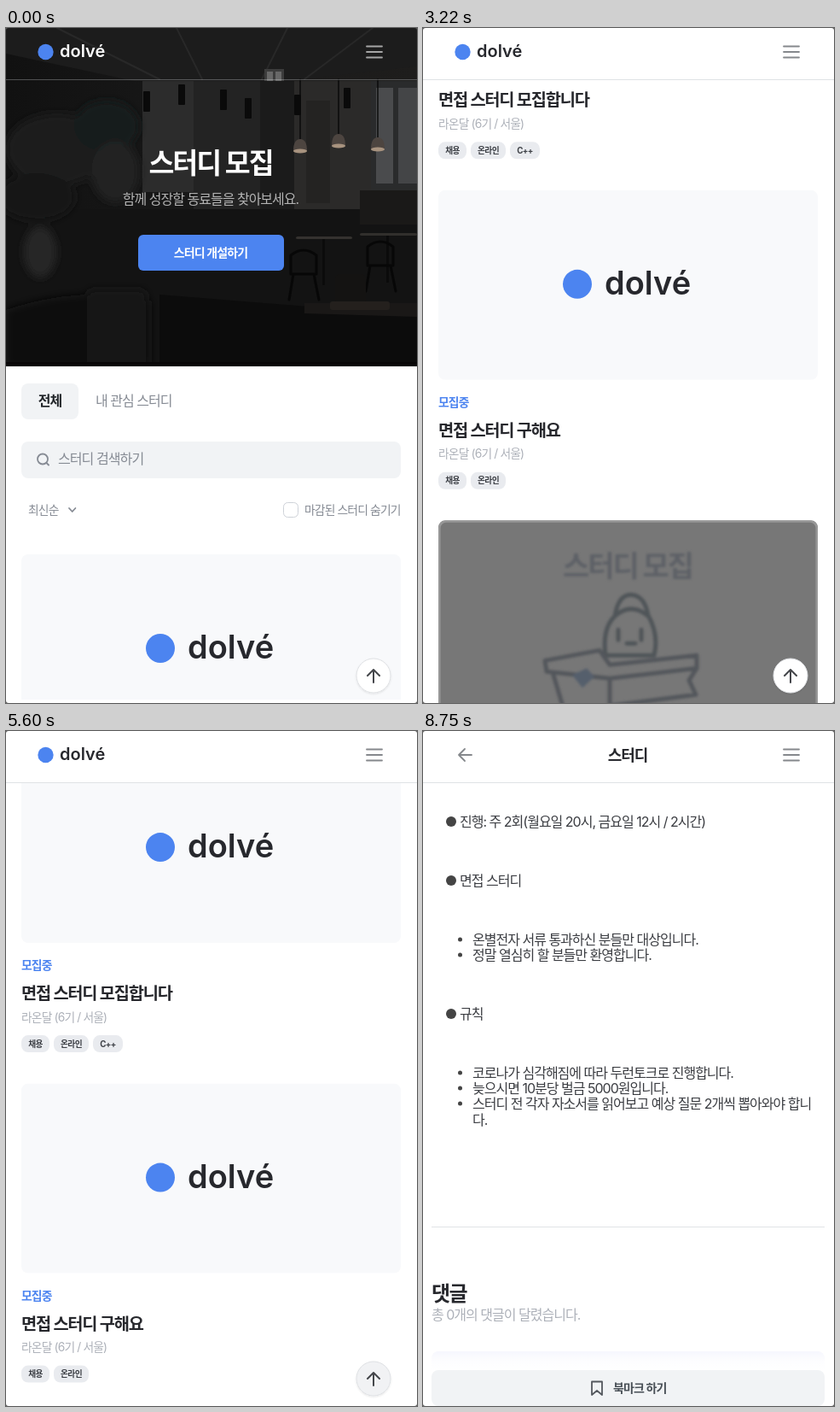
Animation, 482 px wide and 790 px high, one loop 8.82 s. Source, as an HTML page:

```html
<!DOCTYPE html>
<html lang="ko">
<head>
<meta charset="utf-8">
<title>스터디 모집</title>
<style>
  html, body { margin: 0; width: 100%; height: 100%; overflow: hidden; background: #fff; }
  svg { display: block; width: 482px; height: 790px; }
  text { font-family: Inter, "Noto Sans CJK KR", "Noto Sans CJK", "Noto Sans KR", sans-serif; letter-spacing: -.062em; white-space: pre; }
  .brand { font-family: Inter, sans-serif; letter-spacing: 0; }
</style>
</head>
<body>
<svg id="stage" viewBox="0 0 482 790"></svg>
<script>
const LOOP = 8820, STEP = 70, PITCH = 386.5, FIRST = 616;
const BLUE = '#4c84f0', INK = '#27282d', GRAY = '#868b94', PALE = '#adb1b9', FIELD = '#f1f3f5';

// Drawing helpers
const rect = (x, y, w, h, fill, r = 0, more = '') => `<rect x="${x}" y="${y}" width="${w}" height="${h}" rx="${r}" fill="${fill}" ${more}/>`;
const oval = (x, y, rx, ry, fill, more = '') => `<ellipse cx="${x}" cy="${y}" rx="${rx}" ry="${ry}" fill="${fill}" ${more}/>`;
const dot = (x, y, r, fill, more = '') => oval(x, y, r, r, fill, more);
const path = (d, fill, more = '') => `<path d="${d}" fill="${fill}" ${more}/>`;
const line = (d, stroke, w = 2, more = '') => `<path d="${d}" fill="none" stroke="${stroke}" stroke-width="${w}" stroke-linecap="round" stroke-linejoin="round" ${more}/>`;
const text = (x, cy, s, size, fill, weight = 400, anchor = 'start') =>
  `<text x="${x}" y="${(cy + size * .37).toFixed(2)}" font-size="${size}" fill="${fill}" font-weight="${weight}" text-anchor="${anchor}">${s}</text>`;
const group = (body, more = '') => `<g ${more}>${body}</g>`;
const brand = (x, base, size, fill, more = '') =>
  `<text class="brand" x="${x}" y="${base}" font-size="${size}" font-weight="600" fill="${fill}" ${more}>dolvé</text>`;

function tag(x, y, s) {
  const w = 17 + [...s].reduce((n, c) => n + (c > 'z' ? 8 : 6), 0);
  return { w, svg: rect(x, y, w, 20, '#e9ebef', 8) + text(x + w / 2, y + 10, s, 9.7, '#3c3f45', 700, 'middle') };
}

function heroPhoto() {
  const lamp = (x, y) => line(`M${x} 60V${y - 8}`, '#0b0b0b', 1.5) +
    path(`M${x - 8} ${y + 6}q0-14 8-14t8 14z`, '#4d4540') + oval(x, y + 6, 8, 2.5, '#a8937f');
  const spot = (x, y) => rect(x - 4, y, 8, 24, '#0a0a0a', 1);
  const chair = (x, y) => line(`M${x} ${y}q15-12 30 0v22h-30zm3 22l-5 30m29-30l6 30`, '#070707', 3);
  return group(rect(0, 0, 482, 396, 'url(#room)') +
    path('M0 0H482V45L330 62H150L0 30Z', '#1c1c1c') +
    line('M60 0L180 60M200 0L230 60M330 0L300 60M430 0L350 60', '#282828', 2) +
    rect(303, 48, 23, 18, '#3c3c3c') + rect(306, 51, 7, 11, '#686868') + rect(316, 51, 7, 11, '#686868') +
    rect(160, 62, 60, 130, '#2c2c2c') + rect(220, 62, 78, 150, '#232323') + rect(298, 62, 40, 150, '#1b1b1b') +
    rect(338, 62, 90, 150, '#2b2a29') + rect(352, 85, 28, 120, '#242322') +
    rect(428, 62, 54, 128, '#2a2b2c') + rect(434, 70, 20, 112, '#4a4b4d') + rect(460, 70, 22, 112, '#444547') +
    rect(0, 212, 482, 184, '#131313') + rect(415, 190, 67, 40, '#1a1918') +
    group(oval(60, 142, 60, 42, '#1b1c1c') + oval(118, 115, 38, 30, '#191a1a') + oval(128, 168, 28, 36, '#212222') +
      oval(36, 198, 45, 28, '#161717') + oval(40, 262, 19, 30, '#262626') +
      path('M0 330Q90 300 170 320V396H0Z', '#101010') + rect(95, 306, 70, 100, '#191918', 8), 'filter="url(#soft)"') +
    [[165, 74], [206, 66], [255, 72], [284, 82], [342, 78], [400, 70]].map(p => spot(...p)).join('') +
    lamp(345, 138) + lamp(390, 132) + lamp(436, 136) +
    rect(340, 244, 66, 3, '#35322f', 2) + rect(371, 247, 3, 54, '#0b0b0b') + rect(415, 240, 67, 3, '#312f2c', 2) + rect(446, 243, 3, 55, '#0b0b0b') +
    chair(334, 266) + chair(424, 256) +
    path('M180 312L482 336V396H180Z', '#0c0c0c') + path('M350 322H482V338L350 334Z', '#1a1817') +
    rect(386, 288, 36, 36, '#141312', 5) + rect(380, 320, 70, 10, '#24201d', 3) + rect(0, 391, 482, 5, '#080607'),
    'clip-path="url(#heroClip)"');
}

const logoThumb = () => rect(18, 0, 445, 222, '#f8f9fb') + dot(181, 110, 17, BLUE) + brand(213, 122, 38, INK);

function deskThumb(dy) {
  const skin = '#f9c5ab', navy = '#2d2b5c', wood = '#fdbf8a';
  const plant = (x, c) => path(`M${x} 188q-14-40-6-60q10 24 6 60q0-40 13-62q0 46-13 62q-14-16-8-38q10 18 8 38z`, c) +
    path(`M${x - 6} 188h13l3 27q-1 8-9 8t-10-8z`, '#b9d5f0');
  return rect(18, 0, 445, 222, '#fff') + group(
    oval(247, 222, 165, 5, '#e9ebee') + dot(181, -9, 16, '#fff', 'stroke="#5b95f0" stroke-width="4"') +
    rect(308, -8, 71, 70, '#dfe9f7') + rect(312, -8, 63, 33, '#c9ddfa') + rect(312, 29, 63, 29, '#f6f9fd') + line('M343 0V25M320 22L336 0', '#e8f1fd', 4) + rect(306, 61, 75, 4, '#cbdcf3') +
    plant(58, '#83cf63') + plant(421, '#62d2b4') +
    line('M97 146L108 151H154M157 151V222', '#cdd3d8', 5) +
    path('M83 121H100L89 222H79Z', wood) + path('M181 121H193L206 222H196Z', wood) +
    path('M103 92Q98 45 125 42Q140 43 138 57L128 80Z', '#f2700f') + path('M123 58L135 56Q139 75 128 77L127 88H117Z', skin) +
    path('M109 79Q122 87 130 80L147 112H90Q92 84 109 79Z', '#f346a0') + path('M94 112H148V122H89Z', '#e5318d') +
    path('M106 122H146Q160 126 163 147L178 215H165L146 151L108 147Z', '#fbda85') + path('M118 147H143L170 216H157Z', '#f7cf73') +
    path('M154 222q3-8 15-9l9 1l5 8z', '#e65b49') +
    path('M157 80H199L187 113H147Z', '#d9dde1') + dot(172, 98, 3, '#fff') +
    path('M243 119H289L283 214H272L264 140L256 214H243Z', navy) + path('M239 222q3-9 18-10l4 10zm29 0q3-9 17-10l5 10z', '#48b848') +
    path('M242 49Q254 38 272 44Q291 47 295 83V112H241L241 73L214 66L217 57L241 61Z', '#7fc83f') +
    path('M270 79Q267 92 253 94L247 88L264 71Z', '#64ad34') + oval(267, 65, 6, 7, skin) +
    oval(256, 26, 9, 13, skin) + path('M240 15Q240 2 252 6Q271 1 270 17L266 28L262 15L247 16L246 26Z', navy) +
    path('M189 37L212 46L245 52L247 66L219 69L203 61Z', '#7767cd') + path('M189 37L212 46L219 69L203 61Z', '#443580') + oval(240, 66, 5, 4, skin) +
    path('M192 108Q220 99 238 109Q258 99 286 108L278 113H198Z', '#6f86b4') + path('M204 107Q222 102 238 110Q254 102 274 107L266 111H210Z', '#8ca5cd') +
    path('M270 121H291L286 222H265Z', '#da965b') +
    path('M326 76Q346 65 365 78Q378 86 380 119H327L323 105L277 117L272 109L318 91Z', '#8fc5f4') + line('M326 104L340 92', '#70abe2', 2) +
    path('M328 119H368L362 144H320L329 213H315L298 147Q300 128 328 119Z', navy) + path('M340 144H325L333 213H342Z', '#24214b') +
    path('M309 222q2-10 14-11l8 11zm22 0l2-11h8l3 11z', '#38bddd') +
    oval(335, 68, 10, 13, skin) + path('M324 61Q322 47 337 49Q358 46 352 68L343 78L341 61Z', navy) +
    rect(68, 112, 273, 9, '#c7dcfb', 4) + rect(68, 112, 114, 9, '#6697f1', 4) +
    path('M363 104H405L402 148Q401 153 390 153H331L334 147H354Z', '#e9ecf0') + path('M342 153H353L340 222H333Z', wood) + path('M374 153H386L398 222H388Z', wood)
    , `transform="translate(0 ${dy})"`);
}

function teamThumb() {
  const deep = '#2f5f9f', hair = '#292b49', brown = '#91573e', pale = '#8fc2ed';
  const chair = (x, s) => group(line('M0 119L13 178H48M15 178L5 218M43 178L56 218', '#4475b7', 4), `transform="translate(${x} 0) scale(${s} 1)"`);
  const note = (x, y, w, h, c) => rect(x, y, w, h, c, 2) + line(`M${x + 5} ${y + 7}h${w - 10}m${10 - w} 5h${w - 15}`, '#fff', 2);
  return rect(18, 0, 445, 222, '#fff') +
    path('M53 40Q66 4 130 6L350 0Q417 8 427 54Q439 146 421 222H72Q48 192 62 149Q72 107 56 78Z', '#e5f0fd') +
    path('M140 0H331V95H140Z', '#f4f9ff') + line('M140 0V95H331V0', '#cde1f9', 5) +
    dot(70, 28, 12, 'none', 'stroke="#f09a93" stroke-width="8"') + line('M70 16A12 12 0 0 1 80 35', '#85c7c9', 8) + line('M58 28A12 12 0 0 1 65 17', '#8eb9f1', 8) +
    note(113, 9, 49, 22, '#9fc6f5') + rect(116, 15, 43, 13, '#f7fbff') + line('M120 20h27m-27 4h20', '#9fc6f5', 2) +
    note(71, 58, 42, 18, '#8fbcf0') + path('M98 76h8v7z', '#8fbcf0') + note(176, 4, 15, 16, '#f3d38e') + note(258, 5, 21, 13, '#f19793') + note(269, 20, 20, 14, '#a6cbf5') +
    [6, 13, 17, 9, 15, 8].map((h, i) => rect(157 + i * 7, 60 - h, 4, h, '#8bb9ef')).join('') +
    path('M212 40Q211 34 208 30A18 18 0 1 1 237 30Q233 34 232 40Z', '#fbdc7c') + line('M217 38L214 20L222 26L230 20L227 38', '#fff2be', 2) + rect(210, 42, 25, 15, '#78a9e8', 4) + rect(217, 55, 11, 6, '#6595d5', 3) +
    dot(326, 20, 17, 'none', 'stroke="#c3daf8" stroke-width="9"') + dot(326, 20, 24, 'none', 'stroke="#c3daf8" stroke-width="6" stroke-dasharray="9 9.85"') +
    dot(380, 13, 7, '#8dcca0') + line('M377 13l2 3l5-5', '#fff', 1.5) + dot(402, 59, 13, '#91bcf0') + path('M403 58V46A13 13 0 0 1 415 58Z', '#ef9386') +
    [351, 358, 365].map(x => dot(x, 62, 2, '#86b6ef')).join('') +
    chair(73, 1) + chair(165, 1) + chair(394, -1) +
    path('M112 112Q128 107 135 127L148 146L141 154H88Q88 122 112 112Z', '#82bbe9') + path('M92 154H140Q152 156 153 174L163 212H152L138 174H104Q91 170 92 154Z', deep) + path('M150 212h14l5 6h-19z', '#24406e') +
    oval(121, 101, 8, 12, '#754938') + path('M107 101Q104 86 122 86Q137 87 131 99L116 97L113 110Z', hair) + line('M110 130L130 149L148 146', '#754938', 4) +
    path('M188 114Q210 107 218 127L229 147L187 157Q173 131 188 114Z', '#9bccf2') + path('M182 154H222Q236 158 232 182L240 207L232 209L222 174H193Z', deep) +
    oval(204, 100, 8, 12, brown) + path('M190 102Q184 88 200 86Q219 86 213 98L199 99L195 110Z', hair) + dot(200, 86, 6, hair) +
    path('M232 209l8-2l1 13h-5z', '#d57f3f') +
    path('M281 106H307L305 148L300 198H289L284 147L272 140Z', '#4f8cc6') + path('M277 78Q298 70 307 86L310 116H276L274 90L252 75L255 68Z', '#74b9e6') +
    rect(242, 65, 16, 11, '#f6cf79', 2, 'transform="rotate(-16 250 71)"') + line('M256 71l6 4', brown, 4) +
    path('M280 54Q282 37 297 39Q313 41 311 64L315 98Q301 106 296 81Z', hair) + oval(287, 57, 7, 12, brown) +
    path('M348 122Q366 108 376 121Q388 137 380 155H342L340 143Z', '#f1e0df') + line('M353 131L341 146L326 145', '#e8574b', 6) +
    path('M340 154H382Q386 176 369 178H347L333 214H325L329 173Q330 157 340 154Z', pale) +
    oval(353, 101, 8, 13, '#f0b69f') + path('M345 91Q358 80 370 94L372 107Q402 96 404 124Q401 146 382 147Q385 134 368 116L357 111Z', hair) +
    path('M231 125H260L252 147H222Z', '#5f91d3') + path('M268 127H296L303 147H275Z', '#78a6dd') +
    rect(149, 147, 189, 4, deep, 2) + line('M244 151V194M244 194L211 212M244 194L277 212', deep, 3) +
    path('M402 202Q382 190 386 174Q402 178 402 202Q393 164 409 159Q419 175 402 202Q411 176 431 177Q431 195 402 202Z', '#a4d5ad') + rect(394, 201, 17, 15, '#638fc7', 3);
}

const closedThumb = () => rect(18, 0, 445, 222, '#777') + rect(19, 1, 443, 220, 'none', 8, 'stroke="#979797" stroke-width="3"') +
  group(text(240, 53, '스터디 모집', 34, '#5d6066', 700, 'middle') +
    line('M214 158Q210 126 225 112Q229 87 244 87Q260 88 264 111Q277 134 271 158ZM225 112Q244 95 264 112M229 128v12m27-12v12M239 144h10', '#505459', 5) +
    line('M143 164L207 152L219 169L321 158V173L219 185L145 177ZM153 181L165 221M219 185V221M321 173L312 187L320 204L219 217', '#53565b', 5) +
    path('M175 181l17-8l9 10l-14 13z', '#555e6c'), 'filter="url(#smudge)"');

function waveThumb() {
  const wave = x => path(`M${x} 0A17 55 0 0 0 ${x} 110A17 55.5 0 0 1 ${x} 221V222H${x + 113}V221A17.5 55.5 0 0 0 ${x + 113} 110A17 55 0 0 1 ${x + 113} 0Z`, '#fff');
  return rect(18, 0, 445, 221, '#9966ff') + wave(66) + wave(317);
}

const cards = [
  [logoThumb(), '온별전자 면접 스터디 구합니다 !!', '라온달 (6기 / 서울)', '채용 온라인 C++'],
  [logoThumb(), '면접 스터디 준비 같이해요!', '라온달 (6기 / 서울)', '채용 온라인 C++'],
  [deskThumb(-4), '면접 준비 같이 하실 분', '밝은코더스 (6기 / 서울)', '채용 온라인 C'],
  [logoThumb(), '면접 스터디 모집합니다', '라온달 (6기 / 서울)', '채용 온라인 C++'],
  [logoThumb(), '면접 스터디 구해요', '라온달 (6기 / 서울)', '채용 온라인'],
  [closedThumb(), '마감된 스터디', '프론트엔드', '프로젝트 온라인', true],
  [waveThumb(), '오호', '꼭붙고말거야', '프로젝트 온라인'],
  [deskThumb(0), '느루장터 면접 준비 스터디', '밝은코더스 (6기 / 서울)', '채용 온라인 C++'],
  [teamThumb(), '면접 스터디', '밝은코더스 (6기 / 서울)', '채용 온라인']
];

function card([thumb, title, author, tags, closed], i) {
  let x = 18;
  const pills = tags.split(' ').map(s => { const p = tag(x, 330, s); x += p.w + 5; return p.svg; }).join('');
  return group(
    group(group(thumb, 'clip-path="url(#thumbClip)"'), `id="thumb${i}"`) +
    text(18, 248, closed ? '모집완료' : '모집중', 13.8, closed ? PALE : BLUE, 700) +
    text(18, 280.6, title, 19.8, INK, 700) + text(18, 308.4, author, 13.8, PALE) + pills,
    `transform="translate(0 ${FIRST + i * PITCH})"`);
}

const listPage = () => heroPhoto() +
  text(240, 157.5, '스터디 모집', 32.5, '#fff', 700, 'middle') +
  text(240, 200, '함께 성장할 동료들을 찾아보세요.', 16, '#b3b3b3', 400, 'middle') +
  rect(155, 242, 171, 42, BLUE, 6) + text(240, 263, '스터디 개설하기', 14, '#fff', 700, 'middle') +
  rect(18, 416, 67, 42, FIELD, 8) + text(51.5, 436, '전체', 16, '#212529', 700, 'middle') + text(105, 436, '내 관심 스터디', 16, GRAY) +
  rect(18, 484, 445, 43, FIELD, 8) + dot(43, 504.5, 6, 'none', `stroke="${GRAY}" stroke-width="1.8"`) + line('M47.5 509L50 511.500', GRAY, 1.8) +
  text(61, 504, '스터디 검색하기', 16.1, GRAY) +
  text(26, 564, '최신순', 13.8, GRAY) + line('M74 562l3.700 4l3.700-4', GRAY, 1.8) +
  rect(325.5, 555.5, 17, 17, '#fff', 5, 'stroke="#ced2d8"') + text(350, 564, '마감된 스터디 숨기기', 13.8, GRAY) +
  cards.map(card).join('');

function detailPage() {
  const icons = [
    dot(29, 0, 8, 'none', 'stroke="#555" stroke-width="1.6"') + dot(29, 0, 4.7, 'none', 'stroke="#555" stroke-width="1.6"') + dot(29, 0, 1.6, '#555'),
    line('M23 7V-7H35V7M21 7H37M27 7V3H31V7M27-3h.1m3.900 0h.1M27 0h.1m3.900 0h.1', '#555', 1.6),
    line('M21-7H28L37 2L31 8L21-1ZM25-3h.1', '#555', 1.6),
    dot(27, -3.5, 3.3, 'none', 'stroke="#555" stroke-width="1.6"') + line('M21 8V6Q21 3 25 3H29Q33 3 33 6V8M32-6.500Q35-5 34-2Q34-1 32 0M35 3.500Q37 4 37 8', '#555', 1.6)
  ];
  const rows = [['종류', '채용'], ['목표 기업', '온별전자'], ['진행 방식', '온라인'], ['모집 인원', '3명']].map(([k, v], i) =>
    group(icons[i], `transform="translate(0 ${502 + i * 36})"`) + text(48, 500 + i * 36, k, 16, INK, 700) + text(154, 500 + i * 36, v, 16, '#33353a')).join('');
  const body = '#3b3d42';
  const head = (y, s) => dot(33, y, 6, '#444') + text(43, y, s, 16, body);
  const item = (y, s) => dot(43.5, y, 2.5, '#444') + text(58, y, s, 16, body);
  const notes =
    head(106, '진행: 주 2회(월요일 20시, 금요일 12시 / 2시간)') + head(175, '면접 스터디') +
    item(244, '온별전자 서류 통과하신 분들만 대상입니다.') + item(262, '정말 열심히 할 분들만 환영합니다.') +
    head(331, '규칙') + item(400, '코로나가 심각해짐에 따라 두런토크로 진행합니다.') + item(418, '늦으시면 10분당 벌금 5000원입니다.') +
    item(436, '스터디 전 각자 자소서를 읽어보고 예상 질문 2개씩 뽑아와야 합니') + text(58, 455, '다.', 16, body) +
    rect(10, 580, 461, 1, '#e1e3e6') + text(10, 658, '댓글', 24, INK, 700) + text(10, 683, '총 0개의 댓글이 달렸습니다.', 16, PALE) +
    rect(10, 726, 461, 100, '#f3f4fd', 8);
  return rect(10, 80, 461, 230, '#f8f9fb', 8) + dot(178, 193, 18, BLUE) + brand(211, 206, 39.3, INK) +
    text(10, 355, '모집중', 18, BLUE, 700) + [364, 370, 376].map(y => dot(459, y, 2.1, '#777')).join('') +
    text(10, 397, '온별전자 면접 스터디 구합니다 !!', 30.5, INK, 700) +
    dot(20, 440, 8, BLUE) + text(46, 439, '라온달 (6기 / 서울)', 16, PALE) + rows + tag(20, 678, 'C++').svg +
    text(44, 757, '공고', 16, INK, 700) + text(145, 757, '댓글', 16, GRAY) + group(notes, 'transform="translate(0 720)"');
}

const menu = id => line('M423 21.500H441M423 28H441M423 34.500H441', '#85888c', 1.8, `id="${id}"`);
const stage = document.getElementById('stage');
stage.innerHTML = `<defs>
  <linearGradient id="room" x2="1" y2="0"><stop stop-color="#111"/><stop offset=".5" stop-color="#191919"/><stop offset="1" stop-color="#1e1d1c"/></linearGradient>
  <linearGradient id="fade" x2="0" y2="1"><stop stop-color="#fff" stop-opacity="0"/><stop offset=".6" stop-color="#fff" stop-opacity=".8"/><stop offset="1" stop-color="#fff"/></linearGradient>
  <filter id="soft"><feGaussianBlur stdDeviation="5"/></filter>
  <filter id="smudge"><feGaussianBlur stdDeviation="1.8"/></filter>
  <filter id="shade" x="-30%" y="-30%" width="160%" height="160%"><feDropShadow dx="0" dy="1" stdDeviation="1.2" flood-opacity=".1"/></filter>
  <clipPath id="heroClip"><rect width="482" height="396"/></clipPath>
  <clipPath id="thumbClip"><rect x="18" y="0" width="445" height="222" rx="8"/></clipPath>
  <clipPath id="view"><rect width="482" height="790"/></clipPath>
</defs>` + group(
  rect(0, 0, 482, 790, '#fff') +
  group(group(listPage(), 'id="listBody"') + rect(0, 786, 482, 4, '#fff', 0, 'id="strip"') +
    rect(0, 0, 482, 60, '#fff', 0, 'id="bar"') + rect(0, 60, 482, 1, '#dfe2e5', 0, 'id="rule"') +
    dot(46.5, 28, 9.2, BLUE) + brand(63, 34, 20, INK, 'id="name"') + menu('menu') +
    dot(431, 758, 20, '#fff', 'id="topBtn" stroke="#dfe1e4" filter="url(#shade)"') + line('M431 766V751M424 758L431 751L438 758', '#45474b', 2), 'id="list"') +
  group(group(detailPage(), 'id="detailBody"') + rect(0, 0, 482, 60, '#fff') + rect(0, 60, 482, 1, '#dfe2e5') +
    line('M57 28H42M49 21L42 28L49 35', '#85888c', 1.8) + text(240, 28, '스터디', 18, INK, 700, 'middle') + menu('menu2') +
    rect(0, 720, 482, 28, 'url(#fade)') + rect(0, 748, 482, 42, '#fff') + rect(10, 748, 461, 42, FIELD, 8) +
    line('M198 761.500H210V777L204 772L198 777Z', '#54585e', 1.8) + text(223, 769, '북마크 하기', 14, '#495057', 700), 'id="detail"') +
  path('M0 0H3Q0 0 0 3ZM482 0V3Q482 0 479 0ZM0 790V787Q0 790 3 790ZM482 790H479Q482 790 482 787Z', '#555'), 'clip-path="url(#view)"');

const el = id => document.getElementById(id);
const set = (id, attrs) => { for (const k in attrs) el(id).setAttribute(k, attrs[k]); };
const clamp = u => Math.min(1, Math.max(0, u));
const easeOut = u => 1 - (1 - clamp(u)) ** 2;
const smooth = u => { u = clamp(u); return u * u * (3 - 2 * u); };

function track(t, keys) {
  const i = keys.findIndex(k => k[0] > t);
  if (i === 0) return keys[0][1];
  if (i < 0) return keys[keys.length - 1][1];
  const [t0, a] = keys[i - 1], [t1, b] = keys[i];
  return a + (b - a) * (t - t0) / (t1 - t0);
}
const LIST = [[1400, 0], [1540, 75], [2450, 1190], [3780, 2541], [4130, 3045], [4200, 3108], [4270, 3137.5]];
const DETAIL = [[7700, 0], [7770, 16], [8540, 655], [8680, 709], [8750, 720]];

function draw(ms) {
  const t = Math.floor(ms % LOOP / STEP) * STEP;
  const onDetail = t >= 7070;
  set('list', { display: onDetail ? 'none' : 'inline' });
  set('detail', { display: onDetail ? 'inline' : 'none' });
  if (onDetail) {
    set('detailBody', { transform: `translate(0 ${-track(t, DETAIL)})`, opacity: clamp((t - 7000) / 280) });
    return;
  }
  const y = track(t, LIST) * (1 - smooth((t - 5180) / 910));
  const solid = easeOut((t - 1400) / 400) - easeOut((t - 6160) / 400);
  const dark = t < 1470 || t >= 6230;
  const zoom = 1 + .02 * smooth((t - 6160) / 350);
  set('listBody', { transform: `translate(0 ${-y.toFixed(2)})` });
  set('thumb0', { transform: `translate(240.5 111) scale(${zoom}) translate(-240.5 -111)` });
  set('strip', { display: t < 1470 ? 'inline' : 'none' });
  set('bar', { 'fill-opacity': solid });
  set('rule', { 'fill-opacity': .3 + .7 * solid });
  set('name', { fill: dark ? '#fff' : INK });
  set('menu', { stroke: dark ? '#a5a5a5' : '#85888c' });
  set('topBtn', { fill: t >= 4970 && t < 6230 ? '#f1f2f4' : '#fff' });
}

const start = performance.now();
(function tick() {
  draw(performance.now() - start);
  requestAnimationFrame(tick);
})();
</script>
</body>
</html>
```
